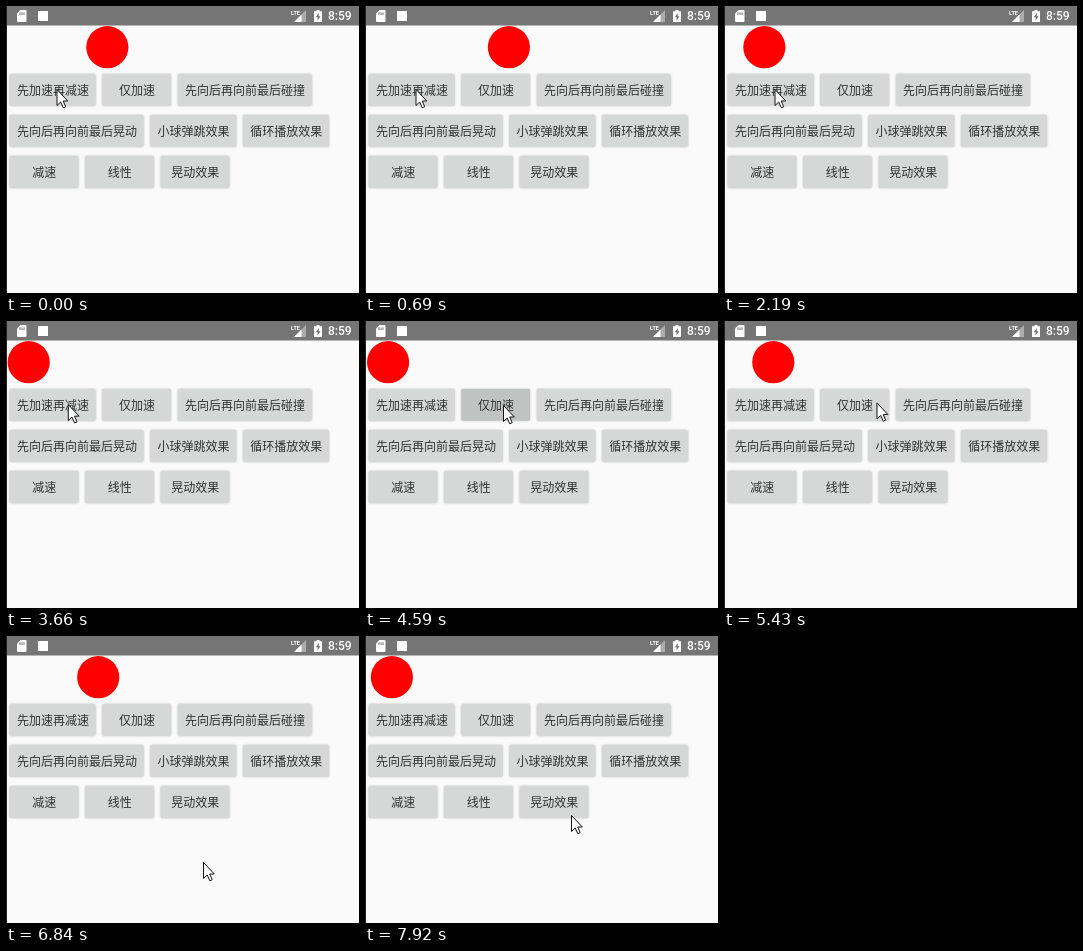
Recreate the animation shown at these times as an HTML page. Size 353 px wide and 287 px high, loop 8000 ms.

```html
<!DOCTYPE html>
<html lang="zh-CN">
<head>
<meta charset="utf-8">
<title>动画插值器</title>
<style>
  html, body { margin: 0; width: 100%; height: 100%; overflow: hidden; background: #fafafa; }
  svg { display: block; width: 353px; height: 287px; }
  .btn rect { fill: #d6d7d7; filter: drop-shadow(0 .6px .8px rgba(0, 0, 0, .25)); }
  .btn text { font: 12px "Noto Sans CJK SC", "Noto Sans CJK", sans-serif; fill: #333; text-anchor: middle; }
  .clock { font: 500 12px Roboto, sans-serif; fill: #fff; }
  .lte { font: bold 5.5px Roboto, sans-serif; fill: #fff; }
</style>
</head>
<body>
<svg viewBox="0 0 353 287">
  <rect width="353" height="287" fill="#fafafa"/>
  <rect width="353" height="19.5" fill="#757575"/>
  <g fill="#fff">
    <path d="M14.5 4H19.5Q20.5 4 20.5 5V15Q20.5 16 19.5 16H12Q11 16 11 15V7.5Z"/>
    <path d="M14 6.3V9M16 6.3V9M18 6.3V9" stroke="#757575"/>
    <rect x="32" y="5" width="10" height="10"/>
    <path d="M300 4V16H288Z" opacity=".4"/>
    <path d="M295.5 8.5V16H288Z"/>
    <path d="M310.5 4H313.5V5.3H316V16H308V5.3H310.5Z"/>
    <path d="M312.8 7L309.8 11.3H311.6V14.6L314.5 10.2H312.8Z" fill="#757575"/>
  </g>
  <text class="lte" x="285" y="8.6">LTE</text>
  <text class="clock" x="322" y="14.3">8:59</text>
  <circle id="ball" cy="41.2" r="21.1" fill="#f00"/>
  <g id="buttons"></g>
  <path d="M.5 0V287" stroke="#222"/>
  <path id="cursor" d="M.5 .5V16.5L4.2 13L6.8 18.8L9.2 17.7L6.7 12H11.3Z" fill="#fff" stroke="#111"/>
</svg>
<script>
  const NS = 'http://www.w3.org/2000/svg';
  const LOOP = 8000, RUN = 1893, LEFT = 22.7, TRAVEL = 121.7;
  const CLOCK = 30, REFRESH = 133.67, PHASE = 21.6;

  const rows = [
    ['先加速再减速', '仅加速', '先向后再向前最后碰撞'],
    ['先向后再向前最后晃动', '小球弹跳效果', '循环播放效果'],
    ['减速', '线性', '晃动效果']
  ];

  // Pointer stops: time, x, y
  const stops = [
    [3540, 50.5, 83], [4470, 138, 84], [4620, 138, 84], [4900, 172, 77], [5430, 150, 82],
    [5850, 137, 167], [6300, 137, 167], [6840, 197, 226], [7350, 200, 259],
    [7620, 200, 259], [7920, 206, 179]
  ];

  function add(parent, name, attrs) {
    const el = document.createElementNS(NS, name);
    for (const key in attrs) el.setAttribute(key, attrs[key]);
    return parent.appendChild(el);
  }

  // Time of the latest screen refresh, on a 30 ms clock
  function lastRefresh(time) {
    const k = Math.floor((Math.floor(time / CLOCK) * CLOCK - PHASE) / REFRESH);
    return k < 1 ? 0 : Math.ceil((PHASE + REFRESH * k) / CLOCK) * CLOCK;
  }

  function pointer(t) {
    const i = stops.findIndex(s => s[0] > t);
    if (i < 1) return stops.at(i).slice(1);
    const [t0, x0, y0] = stops[i - 1], [t1, x1, y1] = stops[i];
    const p = (t - t0) / (t1 - t0);
    return [x0 + (x1 - x0) * p, y0 + (y1 - y0) * p];
  }

  const smooth = p => (1 - Math.cos(Math.PI * p)) / 2;
  const accelerate = p => p * p;

  // Out and back, with the far end reached at `peak`
  function swing(ease, peak, t) {
    return LEFT + TRAVEL * ease(Math.max(0, 1 - Math.abs(t - peak) / RUN));
  }

  const buttons = document.getElementById('buttons');
  rows.forEach((labels, row) => {
    const y = 67.9 + 41.1 * row;
    let x = 3.7;
    for (const label of labels) {
      const width = Math.max(68.6, 12 * label.length + 13.8);
      const g = add(buttons, 'g', { class: 'btn' });
      add(g, 'rect', { x, y, width, height: 31.8, rx: 1.5 });
      add(g, 'text', { x: x + width / 2 + .3, y: y + 20.8 }).textContent = label;
      x += width + 6.9;
    }
  });

  const ball = document.getElementById('ball');
  const cursor = document.getElementById('cursor');
  const pressed = buttons.children[1].firstChild;

  function draw(time) {
    const t = lastRefresh(time);
    const x = t < 3600 ? swing(smooth, 768, t) : swing(accelerate, 6378, t);
    const press = Math.max(0, 1 - Math.abs(t - 4600) / 300);
    const shade = Math.round(214 - 22 * press);
    ball.setAttribute('cx', x);
    cursor.setAttribute('transform', `translate(${pointer(t)})`);
    pressed.style.fill = `rgb(${shade},${shade + 1},${shade + 1})`;
  }

  let start;
  function frame(now) {
    start ??= now;
    draw((now - start) % LOOP);
    requestAnimationFrame(frame);
  }
  draw(0);
  requestAnimationFrame(frame);
</script>
</body>
</html>
```
